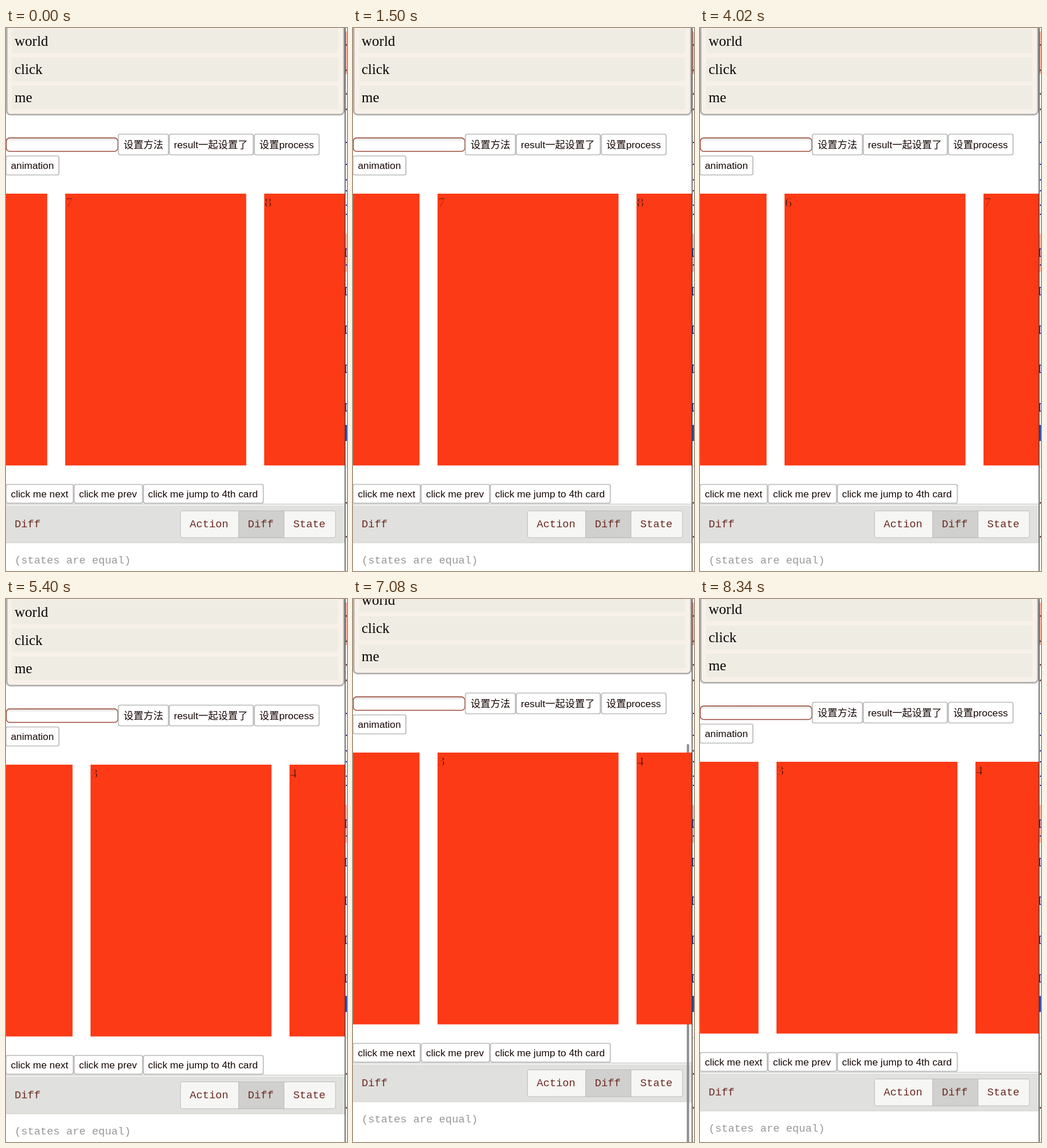
An HTML page that plays this animation: 593 by 944 pixels, repeating every 8.4 s.

```html
<!DOCTYPE html>
<html lang="en">
<head>
<meta charset="utf-8">
<title>Card slider</title>
<style>
  html, body { margin: 0; width: 100%; height: 100%; overflow: hidden; background: #fff; }
  svg { display: block; width: 593px; height: 944px; }
  text { white-space: pre; }
  .serif { font: 25px "Liberation Serif", serif; fill: #080402; }
  .digit { font: 23.5px "Liberation Serif", serif; fill: #1c0703; stroke: #fc3a16; stroke-width: .9; }
  .sans { font: 17.25px "Liberation Sans", "Noto Sans CJK SC", "Noto Sans CJK", sans-serif; fill: #160503; }
  .mono { font: 18.7px "Liberation Mono", monospace; fill: #6b2a22; }
  .quiet { fill: #979797; }
  .button { fill: #fff; stroke: #b9b9b9; stroke-width: 1.7; }
</style>
</head>
<body>
<svg viewBox="0 0 593 944">
  <defs>
    <clipPath id="view"><rect width="589.5" height="944"/></clipPath>
    <linearGradient id="inset" x2="0" y2="1">
      <stop offset="0" stop-color="#d8d4d2"/>
      <stop offset=".25" stop-color="#fff"/>
    </linearGradient>
  </defs>
  <g id="edge"></g>
  <g clip-path="url(#view)">
    <rect width="590" height="944" fill="#fff"/>
    <g id="page"></g>
    <rect id="thumb" x="580.5" width="4" height="710" rx="2" fill="#8d8d8d"/>
    <g id="track"></g>
  </g>
  <rect x="589" width="1.3" height="944" fill="#33333a"/>
</svg>
<script>
const LOOP = 8400, TICK = 60, PITCH = 346;
const $ = id => document.getElementById(id);
const page = $('page'), track = $('track'), thumb = $('thumb'), edge = $('edge');

function add(parent, tag, attrs, label) {
  const el = document.createElementNS('http://www.w3.org/2000/svg', tag);
  for (const k in attrs) el.setAttribute(k, attrs[k]);
  if (label !== undefined) el.textContent = label;
  parent.append(el);
  return el;
}
const box = (parent, x, y, width, height, fill, more) =>
  add(parent, 'rect', { x, y, width, height, fill, ...more });
const write = (parent, cls, x, y, label) => add(parent, 'text', { class: cls, x, y }, label);

function button(x, y, w, h, label, pad = 8.5) {
  add(page, 'rect', { class: 'button', x: x + .5, y: y + .5, width: w - 1, height: h - 1, rx: 3 });
  write(page, 'sans', x + pad, Math.round(y + h / 2 + 6), label);
}

// word list
box(page, 1.2, -200, 586.5, 350.7, '#f8f1ea', { rx: 7, stroke: '#b1b0ad', 'stroke-width': 2.8 });
['hello', 'world', 'click', 'me'].forEach((word, i) => {
  const y = -47 + i * 49;
  box(page, 10, y, 568, 41.5, '#efece4', { rx: 4 });
  write(page, 'serif', 15, y + 28.5, word);
});

// form
box(page, .5, 191, 194, 23.5, 'url(#inset)', { rx: 6, stroke: '#984632', 'stroke-width': 1.5 });
button(195, 184, 88, 37, '设置方法', 9.5);
button(283.5, 184, 147, 37, 'result一起设置了');
button(431.5, 184, 113.5, 37, '设置process', 9);
button(-.5, 222, 93, 34, 'animation', 9);
button(-.5, 793, 118, 33.5, 'click me next', 9);
button(118, 793, 120, 33.5, 'click me prev', 9);
button(238.5, 793, 209.5, 33.5, 'click me jump to 4th card');

// inspector
box(page, 0, 827, 590, 1.5, '#c9c9c6');
box(page, 0, 830, 590, 65, '#e0e0de');
box(page, 0, 894.5, 590, 1, '#cfcfca');
write(page, 'mono', 15, 868, 'Diff');
box(page, 303.5, 839.5, 269.5, 46.5, '#f6f6f4', { rx: 3, stroke: '#bcbcba' });
box(page, 404.5, 839.5, 79, 46.5, '#d0d0ce', { stroke: '#bcbcba' });
write(page, 'mono', 319.5, 868, 'Action');
write(page, 'mono', 420.5, 868, 'Diff');
write(page, 'mono', 499.5, 868, 'State');
write(page, 'mono quiet', 15, 931, '(states are equal)');

// cards
for (let i = 0; i < 11; i++) {
  box(track, i * PITCH, 288, 314.7, 472.5, '#fc3a16');
  write(track, 'digit', i * PITCH + 1, 311, i);
}

// sliver of the window behind
box(edge, 589, 0, 4, 944, '#f4f4f6');
box(edge, 590, 6, 3, 74, '#fbab9b');
box(edge, 590, 358, 3, 66, '#fbb9ad');
box(edge, 590, 690, 3, 28, '#2450b4');
for (const y of [198, 236, 263, 282, 307, 323, 411])
  box(edge, 591, y, 2, 2, '#1c1c80');
for (const y of [384, 451, 518, 586, 653])
  box(edge, 590.8, y, 3, 13, 'none', { stroke: '#1c1c80', 'stroke-width': 1.5 });
for (const y of [28, 72, 113, 140, 824, 883])
  box(edge, 591, y, 2, 3, '#6d4a4a');
box(edge, 590, 762, 3, 1, '#d5b8b4');

// [time, value, easing into this step]
const smooth = p => p * p * (3 - 2 * p);
const out = p => 1 - (1 - p) ** 3;
const jump = p => p < 1 ? 0 : 1;
const slide = [
  [0, 7 + 44 / PITCH], [900, 8, smooth],
  [1260, 8], [1500, 7, out],
  [1920, 7], [2340, 6.45, smooth], [2820, 7, smooth],
  [3360, 7], [4020, 6, smooth],
  [4920, 3, jump],
  [7560, 3], [8340, 3 + 14 / PITCH, smooth]
];
const scroll = [
  [5760, 0], [6360, 34, smooth], [6600, 40, smooth], [6720, 38, smooth],
  [7080, -21, smooth], [7500, -30, smooth], [7620, -28, smooth], [8340, -5, out]
];
const fade = [[5760, 0], [5880, 1, smooth], [7560, 1], [7860, 0, smooth]];

function at(steps, t) {
  const i = steps.findIndex(s => s[0] > t);
  if (i < 0) return steps[steps.length - 1][1];
  if (i === 0) return steps[0][1];
  const [t0, a] = steps[i - 1], [t1, b, ease = p => p] = steps[i];
  return a + (b - a) * ease((t - t0) / (t1 - t0));
}

function draw(now) {
  const t = Math.floor((now % LOOP) / TICK) * TICK;
  const y = Math.round(at(scroll, t));
  const x = Math.round(147 - PITCH * at(slide, t));
  page.setAttribute('transform', `translate(0 ${y})`);
  track.setAttribute('transform', `translate(${x} ${y})`);
  thumb.setAttribute('y', 209 + (34 - y) * .78);
  thumb.setAttribute('opacity', at(fade, t));
}

const start = performance.now();
function loop() {
  draw(performance.now() - start);
  requestAnimationFrame(loop);
}
loop();
</script>
</body>
</html>
```
